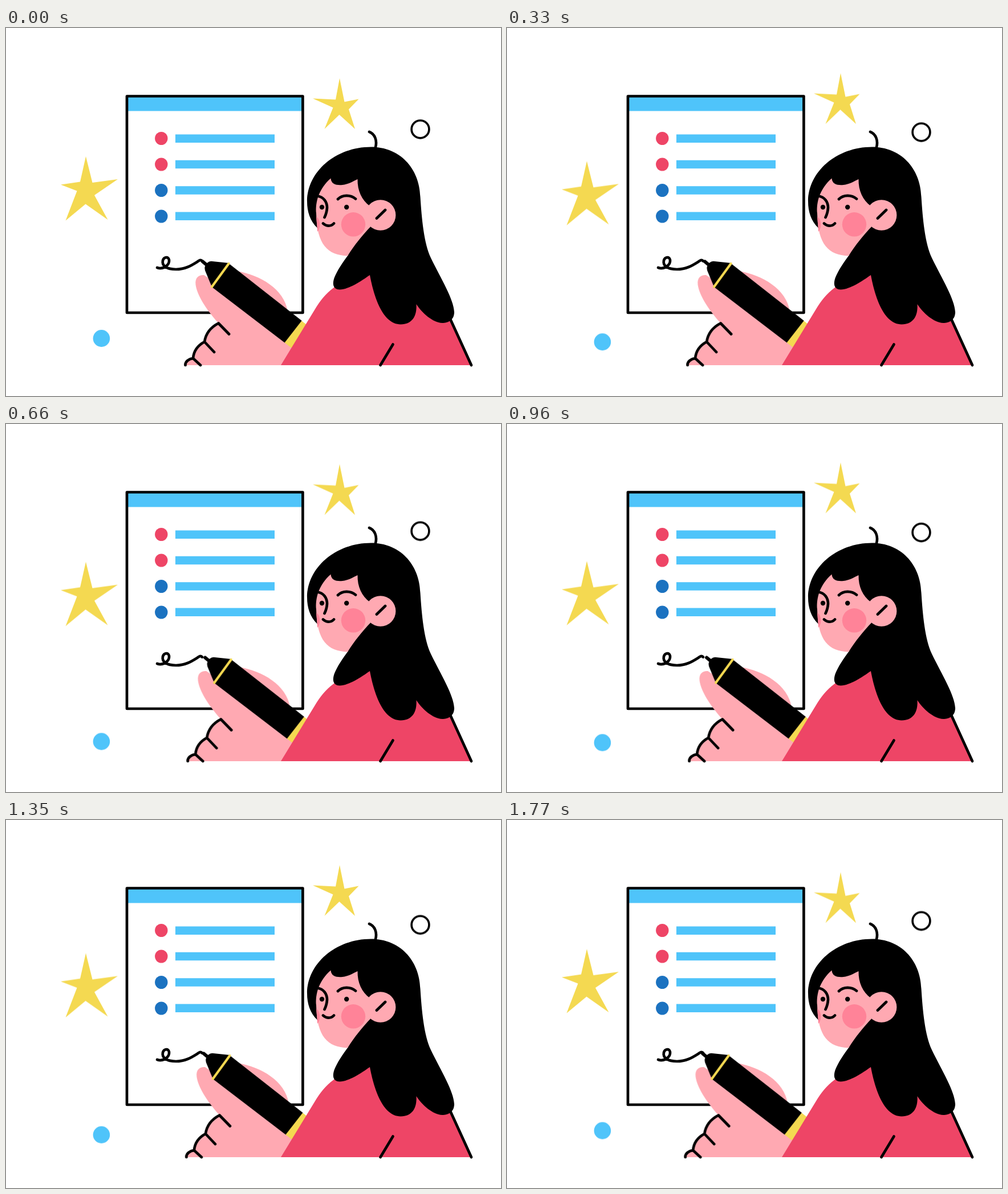
Write an HTML page that moves like this. It is 868 by 645 pixels and loops after 1800 ms.

```html
<!DOCTYPE html>
<html lang="en">
<head>
<meta charset="utf-8">
<title>Signing a checklist</title>
<style>
  html, body { margin: 0; width: 100%; height: 100%; overflow: hidden; background: #fff; }
  svg { display: block; width: 100vw; height: 100vh; }

  .sky { fill: #4fc4fa; }
  .navy { fill: #1b72c0; }
  .red { fill: #ee4566; }
  .skin { fill: #ffa9b2; }
  .blush { fill: #ff8398; }
  .gold { fill: #f4d951; }
  .line { fill: none; stroke: #000; stroke-width: 4.7; stroke-linecap: round; stroke-linejoin: round; }

  .move { animation: 1800ms linear infinite; }
  .star-left { animation-name: star-left; }
  .star-right { animation-name: star-right; }
  .dot { animation-name: dot; }
  .ring { animation-name: ring; }
  .hand { animation-name: hand; }

  /* Each part drifts out and back at its own pace; some snap at the loop point. */
  @keyframes star-left {
    0% { transform: translateY(0); }
    41.9% { transform: translateY(19px); }
    100% { transform: translateY(.6px); }
  }
  @keyframes star-right {
    0% { transform: translateY(0); }
    48.4% { transform: translateY(-23.2px); }
    100% { transform: translateY(4.3px); }
  }
  @keyframes dot {
    0% { transform: translateY(0); }
    47.7% { transform: translateY(16.2px); }
    100% { transform: translateY(0); }
  }
  @keyframes ring {
    0% { transform: translateY(0); }
    49.3% { transform: translateY(13.8px); }
    100% { transform: translateY(-1px); }
  }
  @keyframes hand {
    0% { transform: translateX(0); }
    49.8% { transform: translateX(5.7px); }
    100% { transform: translateX(-2px); }
  }
</style>
</head>
<body>
<svg viewBox="0 0 868 645" preserveAspectRatio="none">
  <path class="gold move star-left" d="M140 225 L151.5 271 L196 265 L155 293 L178.5 336 L139.5 308.5 L104.5 337.5 L124.5 285.5 L96 274.5 L130 269.5Z"/>
  <path class="gold move star-right" d="M585 88 L593.5 129.500 L618.5 124.500 L601 142.500 L612 177 L584.500 152 L558.500 177 L573.500 139.500 L538 123.500 L578 125.500Z"/>
  <ellipse class="sky move dot" cx="167.4" cy="544" rx="14.8" ry="15"/>
  <circle class="line move ring" cx="726.5" cy="177.4" r="15.4" style="stroke-width:3.7"/>

  <!-- Sheet -->
  <rect class="sky" x="213" y="121" width="306" height="24.5"/>
  <rect class="line" x="212" y="119.500" width="308.400" height="379.500"/>
  <g class="red">
    <ellipse cx="272.300" cy="193.500" rx="11.200" ry="11.500"/>
    <ellipse cx="272.300" cy="239" rx="11.200" ry="11.500"/>
  </g>
  <g class="navy">
    <ellipse cx="272.300" cy="284.500" rx="11.200" ry="11.500"/>
    <ellipse cx="272.300" cy="330" rx="11.200" ry="11.500"/>
  </g>
  <path class="sky" d="M297 186.400h174v14.500h-174z m0 45.400h174v14.500h-174z m0 45.400h174v14.500h-174z m0 45.400h174v14.500h-174z"/>
  <path class="line" d="M265 420 C275 424 287 416 286 406.500 C285 400 277 401 275 407.500 C273 417 282 423 298 423 C317 423 329 413.500 339 407.500 Q341.500 406 344 408.500"/>

  <!-- Hand and pen -->
  <g class="move hand">
    <path class="skin" d="M314.500 591 C314 585 320 580 328 579 C329 567 335 557 348 550 C350 537 358 525 372.500 517.500 C350 492 335 468 332.500 450 C331 437 338 432.500 347 433 L365 445 L405 426 C445 433 488 457 494 497 L520 560 L500 591Z"/>
    <path class="line" d="M391 536.500 L372.500 517.500 C358 525 350 537 348 550 L365 568 M348 550 C335 557 329 567 328 579 L341 591 M328 579 C320 580 314 585 314.500 591"/>
    <path class="line" d="M345 409.500 L354 417" style="stroke-width:6"/>
    <path d="M349 425 Q347.500 419 350 415 L353 411.500 Q356 408.500 360 408.700 L391 412 L361 454Z"/>
    <path class="gold" d="M518 513 L550 538 L520 576 L488 551Z"/>
    <path d="M391 413 L518.500 513 L488.500 551.500 L361 454Z"/>
    <path d="M390.500 413 L361 453.500" stroke="#f4d951" stroke-width="4.200" stroke-linecap="round"/>
  </g>

  <!-- Body -->
  <path class="red" d="M482 591 L544.500 488.500 C554 473 565 462 580 451 L640 425 L779 510 L816 591Z"/>
  <path class="line" d="M779 510 L816 591 M678.500 554.500 L656.500 591"/>

  <!-- Head -->
  <path d="M546 350.500 C533 338 528 322 528 304 C528 252 578 208.500 640 208.500 C690 208.500 725 245 726.500 296 C729 335 733 378 745 403 C763 440 785 475 786 498 C786 512 775 517 765 517 C748 516 730 500 719.500 484 C721 505 712 519.500 692 519.500 C660 519 645 470 638 433 C622 444 602 458 585 458.500 C573 458 572 448 576 437 C581 425 590 411 600 398Z"/>
  <path class="skin" d="M569.500 263.500 C570 274 580 276 590 275 C600 274 608 269 616.500 265 C616 285 624 302 638 312 L640 347.500 C626 362 611 380 599 399.500 C564 398 545 380 544 325 C542 305 549 281 569.500 263.500Z"/>
  <circle class="skin" cx="656.700" cy="328" r="26.700"/>
  <circle class="blush" cx="609" cy="344.300" r="21.200"/>
  <path class="blush" d="M544.200 331 C552 335 552 351 546 357Z"/>
  <circle cx="554" cy="314" r="4.200"/>
  <circle cx="597.200" cy="314" r="4.200"/>
  <path class="line" d="M546 294.500 C557 296 563 305 563 315 Q562.500 324 558.500 332 M582 300 C590 292 604 292 613 299.500 M556 342.500 C562 348 570 348 575 342.500 M650 333.500 L665 319 M637 182 C647 186 651 197 648 209"/>
</svg>
</body>
</html>
```
